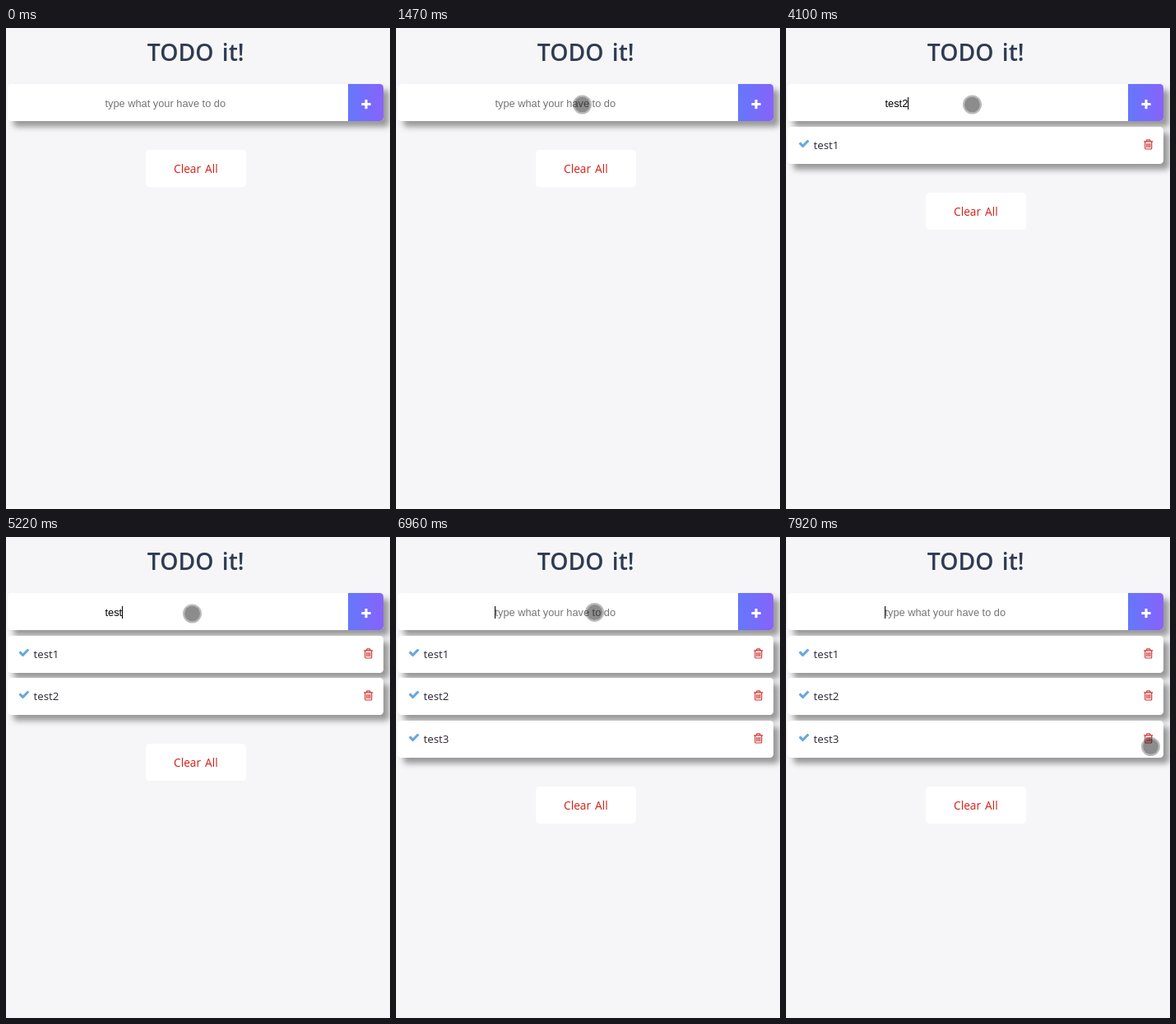
An HTML page with a canvas that plays this animation: 467x584 px, repeating every 7.99 s.

```html
<!DOCTYPE html>
<html lang="en">
<head>
<meta charset="utf-8">
<title>TODO it!</title>
<style>
  html, body { margin: 0; width: 100%; height: 100%; overflow: hidden; background: #f6f6f8; }
  canvas { display: block; }
</style>
</head>
<body>
<canvas id="stage" width="467" height="584"></canvas>
<script>
const ctx = document.getElementById('stage').getContext('2d');
const LOOP = 7990, TICK = 66.9, FOCUS = 940, BLINK = 475;
const LEFT = 2, RIGHT = 459, BAR_H = 45, BAR_Y = 68, PITCH = 51.7, RADIUS = 4.5;
const FIELD_X = 120.5, BUTTON_X = 416;
const UI = '"Open Sans", "Noto Sans", sans-serif';
const FIELD = '12.8px "Liberation Sans", Arial, sans-serif';

// Each round types "test" evenly, then its number, then adds the item.
const rounds = [
  { start: 2350, word: 2610, digit: 2810, add: 3290 },
  { start: 3560, word: 3900, digit: 4100, add: 4560 },
  { start: 4820, word: 5220, digit: 5550, add: 6010 }
];

// Pointer moves along Bezier curves and rests between them.
const easeOut = k => 1 - (1 - k) ** 2;
const linear = k => k;
const moves = [
  { from: 66, to: 535, ease: easeOut, curve: [[388, 527], [270, 270], [202, 67]] },
  { from: 535, to: 870, ease: easeOut, curve: [[202, 67], [222, 109], [226.5, 93]] },
  { from: 6889, to: 7693, ease: linear, curve: [[226.5, 93], [279, 53], [410, 440], [455.5, 267]] },
  { from: 7693, to: 7890, ease: linear, curve: [[455.5, 267], [443.5, 254.5]] }
];

const checkIcon = new Path2D('M1671 566q0 40-28 68l-724 724-136 136q-28 28-68 28t-68-28l-136-136-362-362q-28-28-28-68t28-68l136-136q28-28 68-28t68 28l294 295 656-657q28-28 68-28t68 28l136 136q28 28 28 68z');

function bezier(points, k) {
  if (points.length === 1) return points[0];
  const next = points.slice(1).map(([x, y], i) => {
    const [px, py] = points[i];
    return [px + (x - px) * k, py + (y - py) * k];
  });
  return bezier(next, k);
}

function pointerAt(time) {
  const t = Math.floor(time / TICK) * TICK;
  const move = moves.filter(m => m.from <= t).pop();
  if (!move) return null;
  const k = Math.min(1, (t - move.from) / (move.to - move.from));
  return bezier(move.curve, move.ease(k));
}

// Field text and the time of the last input at time t.
function fieldAt(t) {
  const i = rounds.findLastIndex(r => r.start <= t);
  if (i < 0) return { value: '', last: FOCUS };
  const { start, word, digit, add } = rounds[i];
  if (t >= add) return { value: '', last: add };
  if (t >= digit) return { value: 'test' + (i + 1), last: digit };
  const step = (word - start) / 3;
  const n = Math.min(3, Math.floor((t - start) / step));
  return { value: 'test'.slice(0, n + 1), last: start + n * step };
}

function box(x, y, w, h, radius, fill) {
  ctx.beginPath();
  ctx.roundRect(x, y, w, h, radius);
  ctx.fillStyle = fill;
  ctx.fill();
}

function text(str, x, y, font, color, align = 'left', gap = 0) {
  ctx.font = font;
  ctx.fillStyle = color;
  ctx.textAlign = align;
  ctx.wordSpacing = gap + 'px';
  ctx.fillText(str, x, y);
}

function bar(y) {
  ctx.save();
  ctx.shadowColor = 'rgba(0,0,0,0.38)';
  ctx.shadowOffsetX = ctx.shadowOffsetY = 7;
  ctx.shadowBlur = 7.5;
  box(LEFT, y, RIGHT - LEFT, BAR_H, RADIUS, '#fff');
  ctx.restore();
}

function trash(x, y) {
  ctx.save();
  ctx.translate(x, y);
  ctx.strokeStyle = '#d03a38';
  ctx.lineWidth = 1.2;
  ctx.lineJoin = 'round';
  ctx.beginPath();
  ctx.moveTo(-5.5, -3.5);
  ctx.lineTo(5.5, -3.5);
  ctx.moveTo(-2.6, -3.5);
  ctx.lineTo(-1.7, -5.5);
  ctx.lineTo(1.7, -5.5);
  ctx.lineTo(2.6, -3.5);
  ctx.roundRect(-4, -3.5, 8, 9.2, [0, 0, 1, 1]);
  for (const dx of [-1.9, 0, 1.9]) {
    ctx.moveTo(dx, -1.3);
    ctx.lineTo(dx, 3.9);
  }
  ctx.stroke();
  ctx.restore();
}

function item(i) {
  const y = Math.round(BAR_Y + PITCH * (i + 1));
  bar(y);
  ctx.save();
  ctx.translate(14.7, y + 13);
  ctx.scale(14.4 / 1792, 14.4 / 1792);
  ctx.fillStyle = '#68a8dc';
  ctx.fill(checkIcon);
  ctx.restore();
  text('test' + (i + 1), 33.5, y + 27, '13.3px ' + UI, '#2b2530');
  trash(440.7, y + 21.3);
}

function addButton() {
  const grad = ctx.createLinearGradient(BUTTON_X, 0, RIGHT, 0);
  grad.addColorStop(0, '#6478fb');
  grad.addColorStop(1, '#8763fb');
  box(BUTTON_X, BAR_Y, RIGHT - BUTTON_X, BAR_H, [0, RADIUS, RADIUS, 0], grad);
  box(432.3, 91, 11.4, 3.1, 0.7, '#fff');
  box(436.45, 86.9, 3.1, 11.4, 0.7, '#fff');
}

function field(t) {
  const { value, last } = fieldAt(t);
  text(value || 'type what your have to do', FIELD_X, 96, FIELD, value ? '#000' : '#757575');
  const lit = t >= FOCUS && Math.floor((t - last) / BLINK) % 2 === 0;
  if (lit) {
    ctx.fillStyle = '#000';
    ctx.fillRect(Math.floor(FIELD_X + ctx.measureText(value).width), 84, 1, 15);
  }
}

function pointer(t) {
  const pos = pointerAt(t);
  if (!pos) return;
  ctx.beginPath();
  ctx.arc(...pos, 9.5, 0, Math.PI * 2);
  ctx.fillStyle = 'rgba(0,0,0,0.45)';
  ctx.fill();
  ctx.beginPath();
  ctx.arc(...pos, 10.5, 0, Math.PI * 2);
  ctx.strokeStyle = 'rgba(0,0,0,0.27)';
  ctx.lineWidth = 2;
  ctx.stroke();
}

function draw(t) {
  ctx.fillStyle = '#f6f6f8';
  ctx.fillRect(0, 0, 467, 584);
  text('TODO it!', 230.7, 40, '600 28.3px ' + UI, '#2f3b52', 'center', 3);

  bar(BAR_Y);
  addButton();
  field(t);

  const count = rounds.filter(r => r.add <= t).length;
  for (let i = 0; i < count; i++) item(i);

  const y = Math.round(148 + PITCH * count);
  box(170, y, 122, BAR_H, RADIUS, '#fff');
  text('Clear All', 230.9, y + 28, '13.7px ' + UI, '#d22018', 'center', 1.5);
  pointer(t);
}

const start = performance.now();
function frame() {
  draw((performance.now() - start) % LOOP);
  requestAnimationFrame(frame);
}
frame();
</script>
</body>
</html>
```
